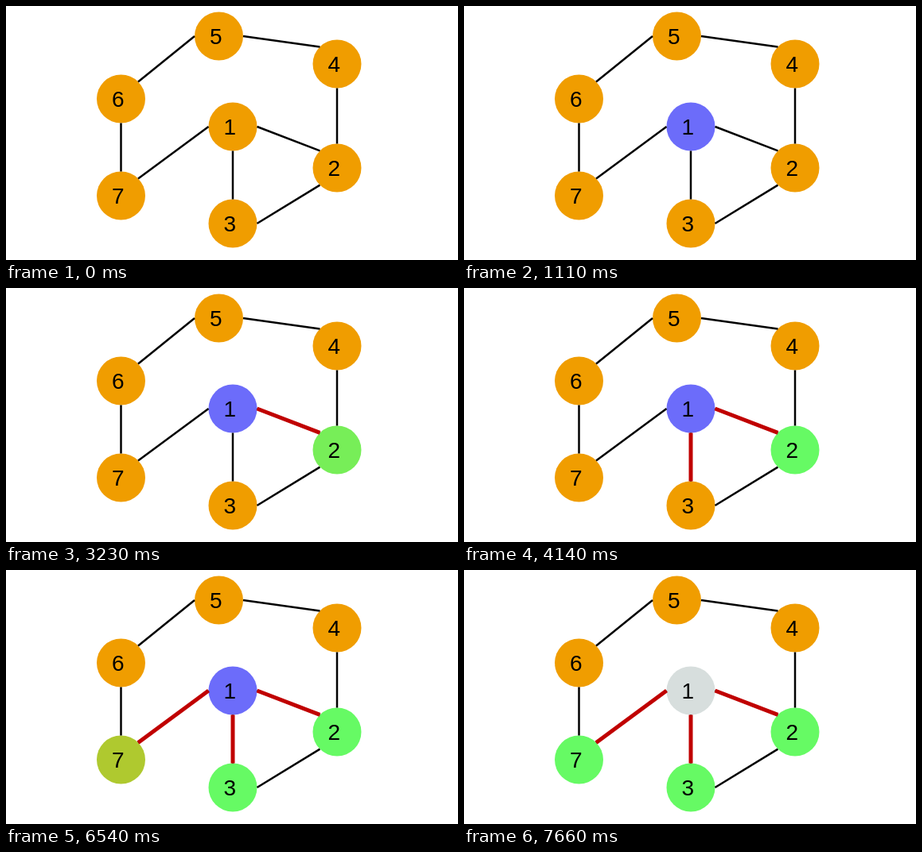
Animation, 568 px wide and 320 px high, one loop 8000 ms. Source, as an HTML page:

```html
<!DOCTYPE html>
<html lang="en">
<head>
<meta charset="utf-8">
<title>Graph search</title>
<style>
html, body { margin: 0; width: 100%; height: 100%; overflow: hidden; background: #fff; }
svg { display: block; width: 568px; height: 320px; }
text { font: 28px "Liberation Sans", Arial, sans-serif; text-anchor: middle; }
line { stroke: #000; stroke-width: 2.5; }
.used { stroke: #c00000; stroke-width: 5; }
</style>
</head>
<body>
<svg id="stage" viewBox="0 0 568 320"></svg>
<script>
const LOOP = 8000, R = 30.5;
const ORANGE = [240, 157, 0], BLUE = [108, 108, 250], GREEN = [102, 250, 100], GREY = [215, 222, 221];

const nodes = {
  1: [285, 152], 2: [416, 204], 3: [285, 274], 4: [416, 73],
  5: [267.5, 38], 6: [144.5, 117], 7: [144.5, 239]
};

// from, its anchor, to, its anchor; anchors are eighths of a turn, clockwise from the right
const edges = {
  '1-2': [1, 0, 2, 5], '1-3': [1, 2, 3, 6], '1-7': [1, 4, 7, 7], '2-3': [2, 3, 3, 0],
  '2-4': [2, 6, 4, 2], '4-5': [4, 5, 5, 0], '5-6': [5, 4, 6, 7], '6-7': [6, 2, 7, 6]
};

// first step, last step, number of steps, node or edge, new node colour
const fades = [
  [590, 1110, 15, 1, BLUE],
  [1870, 2380, 17, '1-2'],
  [2840, 3290, 16, 2, GREEN],
  [3750, 4140, 14, '1-3'],
  [4570, 5020, 16, 3, GREEN],
  [5450, 5900, 16, '1-7'],
  [6330, 6810, 17, 7, GREEN],
  [7110, 7660, 16, 1, GREY]
];

const stage = document.getElementById('stage');

function add(tag, attrs) {
  const el = document.createElementNS('http://www.w3.org/2000/svg', tag);
  for (const key in attrs) el.setAttribute(key, attrs[key]);
  return stage.appendChild(el);
}

function anchor(node, eighth) {
  const [x, y] = nodes[node], a = eighth * Math.PI / 4;
  return [x + R * Math.cos(a), y + R * Math.sin(a)];
}

function addEdge(id, cls) {
  const [from, a, to, b] = edges[id];
  const [x1, y1] = anchor(from, a), [x2, y2] = anchor(to, b);
  return add('line', { x1, y1, x2, y2, class: cls });
}

const discs = {}, used = {};
for (const id in nodes) {
  const [cx, cy] = nodes[id];
  discs[id] = add('circle', { cx, cy, r: R });
  add('text', { x: cx - 3.7, y: cy + 10 }).textContent = id;
}
for (const id in edges) addEdge(id, 'plain');
for (const [, , , id] of fades) if (edges[id]) used[id] = addEdge(id, 'used');

function progress(t, start, end, steps) {
  if (t < start) return 0;
  const done = Math.floor((t - start) / (end - start) * (steps - 1) + 1e-6) + 1;
  return Math.min(1, done / steps);
}

const mix = (a, b, p) => a.map((v, i) => v + (b[i] - v) * p);

function draw(t) {
  const colours = {};
  for (const id in nodes) colours[id] = ORANGE;
  for (const [start, end, steps, id, colour] of fades) {
    const p = progress(t, start, end, steps);
    if (colour) colours[id] = mix(colours[id], colour, p);
    else used[id].setAttribute('opacity', p);
  }
  for (const id in nodes) discs[id].setAttribute('fill', `rgb(${colours[id].map(Math.round)})`);
}

function frame() {
  draw(performance.now() % LOOP);
  requestAnimationFrame(frame);
}
frame();
</script>
</body>
</html>
```
